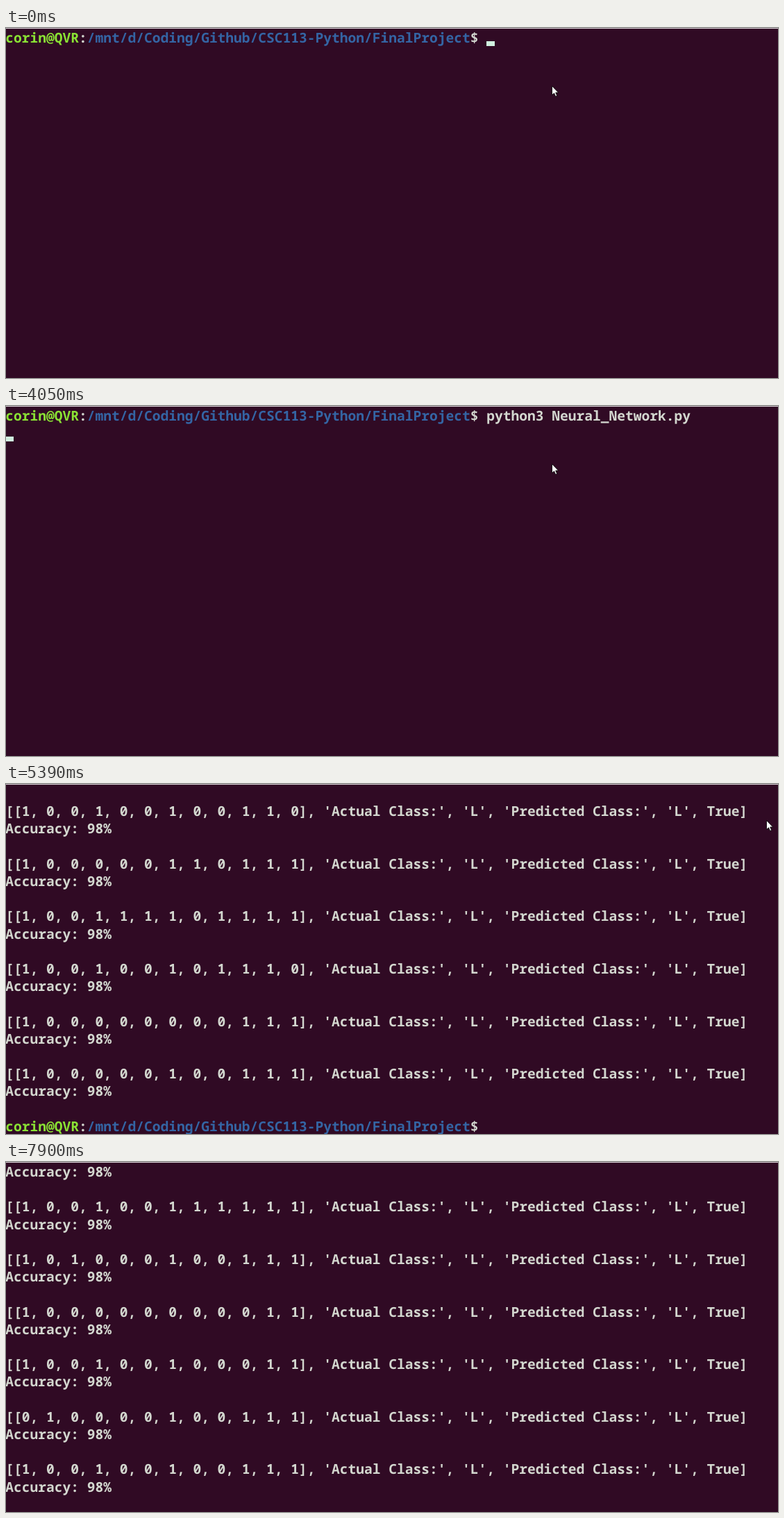
Animation of 1112x504 px, one loop 8000 ms. Source, as an HTML page:

```html
<!DOCTYPE html>
<html lang="en">
<head>
<meta charset="utf-8">
<title>Terminal session</title>
<style>
  html, body { margin: 0; width: 100%; height: 100%; overflow: hidden; background: #300a24; }
  svg { display: block; width: 1112px; height: 504px; }
  text {
    font: 700 19.595px "Noto Sans Mono", "DejaVu Sans Mono", monospace;
    font-variant-ligatures: none;
    text-rendering: geometricPrecision;
    white-space: pre;
    fill: #d3d7cf;
  }
  .user { fill: #8ae234; }
  .path { fill: #3465a4; }
</style>
</head>
<body>
<svg viewBox="0 0 1112 504">
  <rect width="1112" height="504" fill="#300a24"/>
  <rect width="1112" height="1" fill="#d8d2d6"/>
  <g id="lines"></g>
  <rect id="caret" width="12" height="7" fill="#d0f0df"/>
  <path id="pointer" d="M.5 .5V13.6L3.5 10.8L5.6 15.5L7.7 14.6L5.7 10H9.6Z"
        fill="#fff" stroke="#000" stroke-width=".8"/>
</svg>
<script>
const LOOP = 8000, LEFT = -0.8, CELL = 11.757, ROW = 25.2;
const $ = id => document.getElementById(id);

const prompt = '<tspan class="user">corin@QVR</tspan>:' +
  '<tspan class="path">/mnt/d/Coding/Github/CSC113-Python/FinalProject</tspan>$ ';
const PROMPT_COLS = 59;

// Each result takes three rows: list, accuracy, blank.
const results = (percent, rows) => rows.split(" ").flatMap(bits => [
  `[[${[...bits].join(", ")}], 'Actual Class:', 'L', 'Predicted Class:', 'L', True]`,
  `Accuracy: ${percent}%`,
  ""
]);

const command = "python3 Neural_Network.py ";
const typed = n => [prompt + command.slice(0, n)];

const early = results(97,
  "100100100101 100000100111 110100100111 100100110111 100101100111 100100000111 100110100111");
const middle = results(97,
  "100000110111 100100100001 100101100111 100100100111 110100100101 100110110111 100100100111");
const finished = ["", ...results(98,
  "100100100110 100000110111 100111101111 100100101110 100000000111 100000100111"), prompt];
const rerun = ["Accuracy: 98%", "", ...results(98,
  "100100111111 101000100111 100000000011 100100100011 010000100111 100100100111")];

// [time, characters typed]
const keys = [[0, 0], [890, 1], [1140, 2], [1420, 3], [1570, 4], [1700, 5], [1980, 6],
  [2410, 7], [2530, 8], [2960, 9], [3240, 26]];

// [time, lines]
const screens = [
  ...keys.map(([t, n]) => [t, typed(n)]),
  [4200, early], [4320, middle], [4440, finished], [7900, rerun]
];

// [time, column, row]; no column means hidden
const carets = [
  [0, PROMPT_COLS, 0], [120], [620, PROMPT_COLS, 0],
  ...keys.slice(1).map(([t, n]) => [t, PROMPT_COLS + n, 0]),
  [3800], [4050, 0, 1], [4200, 13, 19], [4440, PROMPT_COLS, 19],
  [5390], [5850, PROMPT_COLS, 19], [6380], [6940, PROMPT_COLS, 19], [7370]
];

// [time, x, y]
const pointers = [[0, 786, 83], [4970, 872, 87], [5090, 981, 82], [5240, 1056, 63],
  [5390, 1095, 52], [5540]];

const current = (steps, t) => steps.findLast(step => step[0] <= t);

function place(el, x, y) {
  el.style.display = x === undefined ? "none" : "";
  if (x !== undefined) el.setAttribute("transform", `translate(${x} ${y})`);
}

let shown;
function draw(t) {
  const [, lines] = current(screens, t);
  if (lines !== shown) {
    shown = lines;
    $("lines").innerHTML = lines.map((line, i) =>
      `<text x="${LEFT}" y="${Math.round(21 + i * ROW)}">${line}</text>`).join("");
  }
  const [, col, row] = current(carets, t);
  place($("caret"), col === undefined ? col : Math.floor(LEFT + col * CELL),
    Math.round(19 + row * ROW));
  const [, x, y] = current(pointers, t);
  place($("pointer"), x, y);
}

const start = performance.now();
function tick() {
  draw((performance.now() - start) % LOOP);
  requestAnimationFrame(tick);
}
tick();
</script>
</body>
</html>
```
